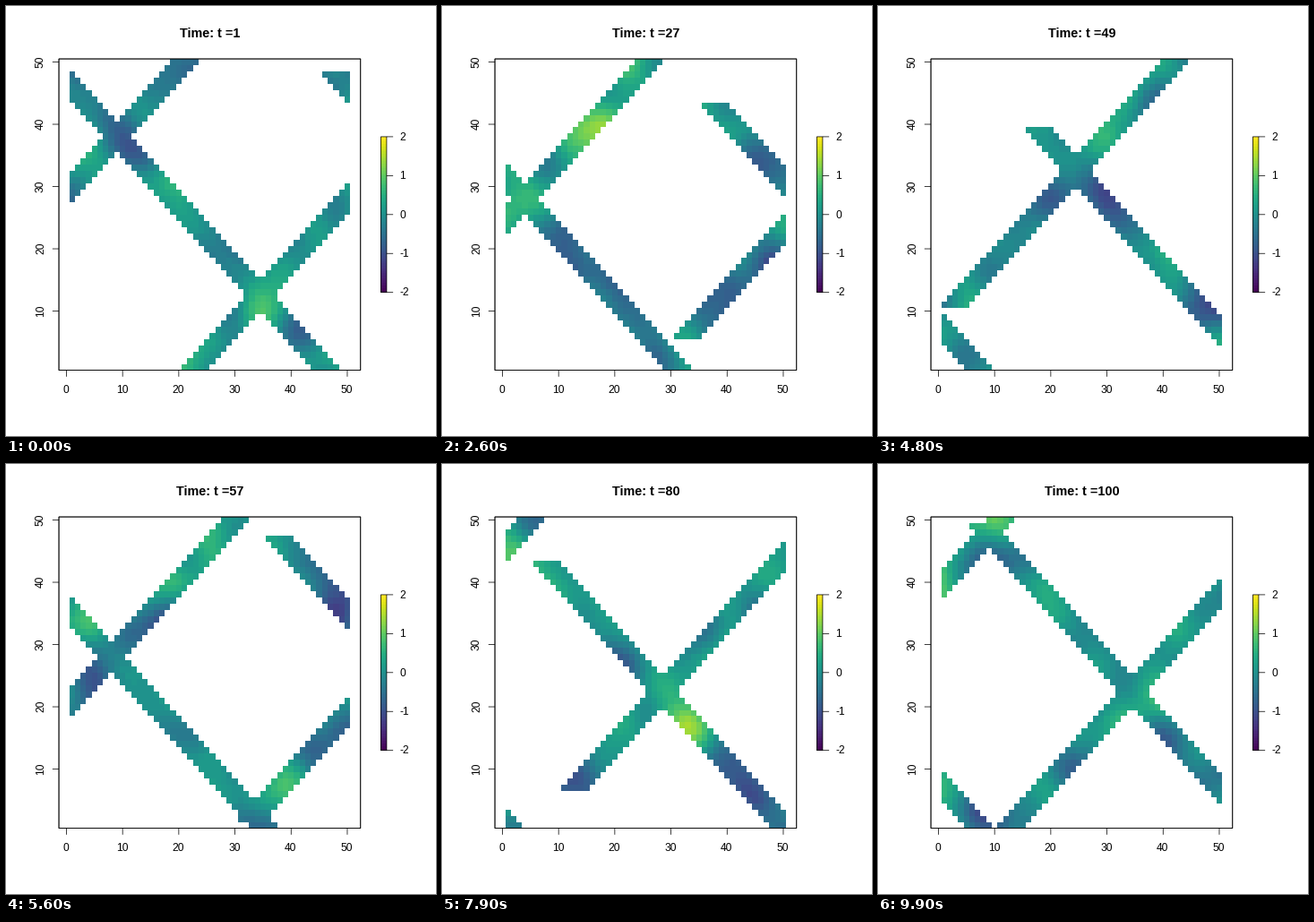
Recreate the animation shown at these times as a matplotlib script. Size 480 by 480 pixels, loop 10 s.

```python
import numpy as np
import matplotlib.pyplot as plt
from matplotlib.animation import FuncAnimation
from matplotlib.patches import Rectangle

SIZE, DPI = 480, 80
PT = 72 / DPI                      # points per pixel
N, WIDTH, CYCLE = 50, 5, 50        # grid size, swath width, repeat of the orbit
LEFT, RIGHT, TOP, BOTTOM = 70.6, 384.1, 59.04, 406.56
DX, DY = (RIGHT - LEFT) / N, (BOTTOM - TOP) / N
BOX_LEFT, BOX_RIGHT = 59.04, 395.76
BAR_LEFT, BAR_RIGHT, BAR_MID, BAR_UNIT = 418.44, 424.92, 232.8, 43.44
plt.rcParams["font.family"] = "Liberation Sans"

col, row = np.meshgrid(np.arange(1, N + 1), np.arange(1, N + 1))

# Grid cell under the centre of each stage pixel
pixel = np.arange(SIZE) + .5
pix_col = np.floor((pixel - LEFT) / DX).astype(int)
pix_row = np.floor((BOTTOM - pixel) / DY).astype(int)
outside = (((pix_row < 0) | (pix_row >= N))[:, None]
           | ((pix_col < 0) | (pix_col >= N))[None, :])
cells = np.ix_(pix_row.clip(0, N - 1), pix_col.clip(0, N - 1))

# Smooth random field: a sum of plane waves
rng = np.random.default_rng(7)
WAVES = rng.normal(0, .33, (24, 3))
PHASES = rng.uniform(0, 2 * np.pi, 24)


def field(t):
    z = sum(np.cos(a * col + b * row + w * t + p)
            for (a, b, w), p in zip(WAVES, PHASES))
    return .12 * z - .05


def band(d):
    return (d >= 0) & (d < WIDTH)


def coverage(t):
    """Cells under the falling and rising swaths, each wrapped once."""
    k = t % CYCLE
    fall_col, fall_row = (5 - 10 * k) % N + 1, 49 - -(-k // 5)
    rise_col, rise_row = (10 + 10 * k) % N + 1, 1 + (k + 1) // 5
    down = col + row - fall_col - fall_row
    up = col - row - rise_col + rise_row
    return (band(down) & (row <= fall_row) | band(down + 49)
            | band(up) & (row >= rise_row) | band(up + 51))


def picture(t):
    return np.ma.masked_where(outside | ~coverage(t)[cells], field(t)[cells])


fig = plt.figure(figsize=(SIZE / DPI, SIZE / DPI), dpi=DPI, facecolor="white")
ax = fig.add_axes([0, 0, 1, 1])


def line(x, y):
    ax.plot(x, y, color="black", lw=.75 * PT, solid_capstyle="butt",
            snap=False, zorder=3)


def label(x, y, s, size=12, **kw):
    return ax.text(x, y, s, fontsize=size * PT, va="baseline",
                   rotation_mode="anchor", **kw)


def frame(x0, y0, x1, y1):
    ax.add_patch(Rectangle((x0, y0), x1 - x0, y1 - y0, fill=False,
                           lw=.75 * PT, ec="black", snap=False, zorder=3))


style = dict(cmap=plt.get_cmap("viridis", 64), vmin=-2, vmax=2,
             aspect="auto", interpolation="nearest")
image = ax.imshow(picture(1), extent=(0, SIZE, SIZE, 0), **style)

bar_top, bar_bottom = BAR_MID - 2 * BAR_UNIT, BAR_MID + 2 * BAR_UNIT
ax.imshow(np.linspace(2, -2, 64)[:, None],
          extent=(BAR_LEFT, BAR_RIGHT, bar_bottom, bar_top), **style)
ax.set_xlim(0, SIZE)
ax.set_ylim(SIZE, 0)
ax.axis("off")

for _ in range(2):                 # overdrawn for a darker edge
    frame(BOX_LEFT, TOP, BOX_RIGHT, BOTTOM)
frame(BAR_LEFT, bar_top, BAR_RIGHT, bar_bottom)

for v in range(0, N + 1, 10):
    x, y = LEFT + (v - .5) * DX, BOTTOM - (v - .5) * DY
    line([x, x], [BOTTOM, BOTTOM + 7.2])
    label(x - .5, 432, str(v), ha="center")
    if v:
        line([BOX_LEFT - 7.2, BOX_LEFT], [y, y])
        label(42, y - .5, str(v), ha="center", rotation=90)
for v in range(-2, 3):
    y = BAR_MID - v * BAR_UNIT
    line([BAR_RIGHT, BAR_RIGHT + 7.2], [y, y])
    label(439, y + 3.8, str(v), ha="left")

title = label((BOX_LEFT + BOX_RIGHT) / 2, 35, "", size=14.4, weight="bold",
              ha="center")


def update(i):
    t = i + 1
    image.set_data(picture(t))
    title.set_text(f"Time: t ={t}")
    return image, title


anim = FuncAnimation(fig, update, frames=100, interval=100, repeat=True,
                     repeat_delay=0, blit=False)
plt.show()
```
